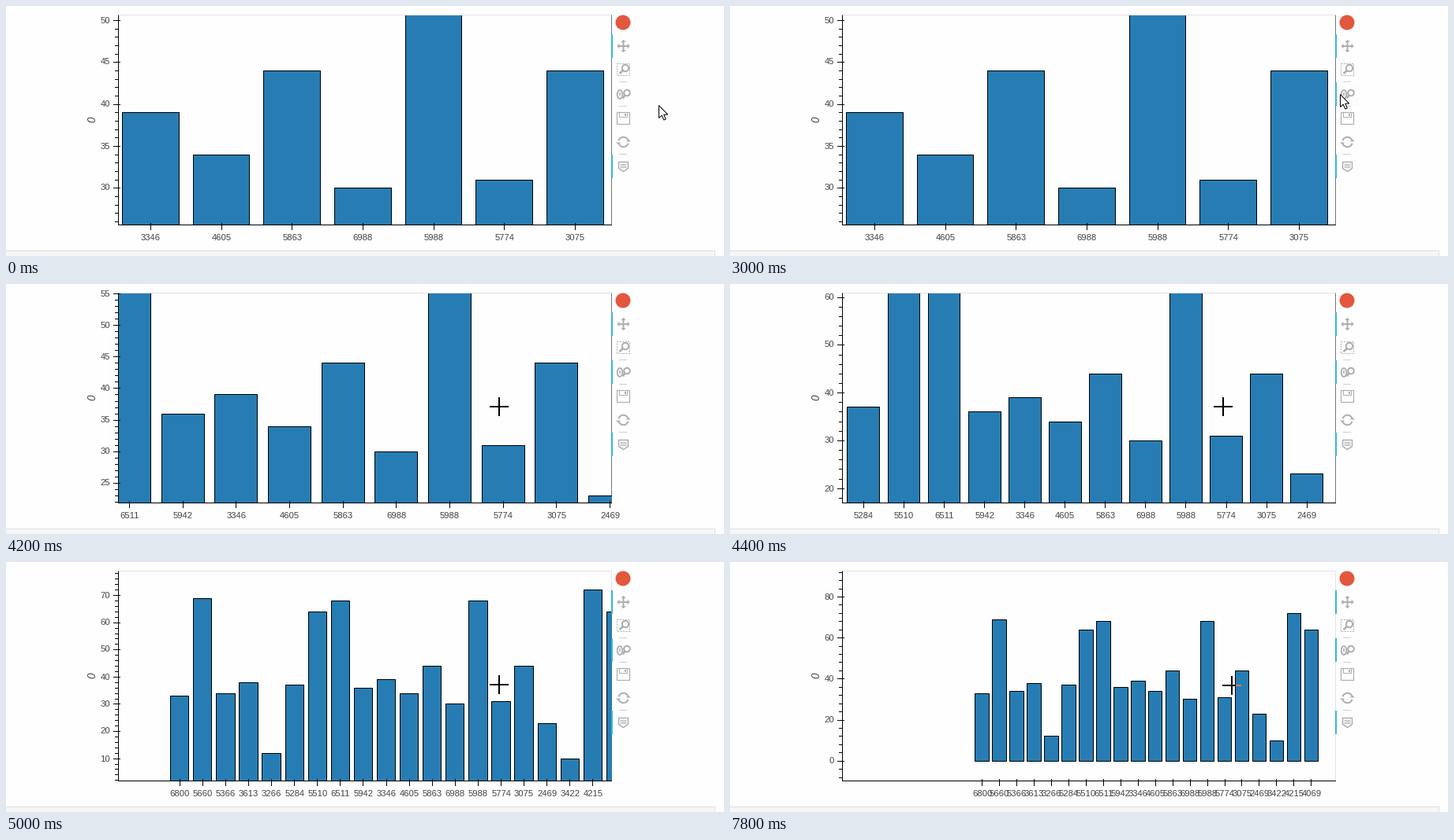
Animation of 910x318 px, one loop 8000 ms. Source, as a matplotlib script:

```python
import matplotlib.pyplot as plt
import numpy as np
from matplotlib.animation import FuncAnimation
from matplotlib.patches import Arc, Circle, Ellipse, Polygon, Rectangle

W, H, DPI = 910, 318, 100
STEP, LOOP = 200, 8000
PX = 72 / DPI
LEFT, RIGHT, TOP, BOTTOM = 142.5, 767.5, 11.5, 278.5

BACK, BLUE, INVERSE = "#fefefe", "#277db3", "#d8824c"
ICON, ACTIVE, INK = "#acafb1", "#3ab5d6", "#444444"

NAMES = ("6800 5660 5366 3613 3266 5284 5510 6511 5942 3346 "
         "4605 5863 6988 5988 5774 3075 2469 3422 4215 4069").split()
VALUES = [33, 69, 34, 38, 12, 37, 64, 68, 36, 39,
          34, 44, 30, 68, 31, 44, 23, 10, 72, 64]
ZOOM_TIMES = [4200, 4400, 4600, 5000, 5200]
ZOOM = 1.325

plt.rcParams["font.family"] = "Liberation Sans"
plt.rcParams["path.snap"] = False  # lines are placed on pixel centres here
fig = plt.figure(figsize=(W / DPI, H / DPI), dpi=DPI, facecolor=BACK)
ax = fig.add_axes([0, 0, 1, 1])
ax.set_xlim(0, W)
ax.set_ylim(H, 0)
ax.axis("off")
plot_area = Rectangle((LEFT, TOP), RIGHT - LEFT, BOTTOM - TOP,
                      transform=ax.transData)
live = []


def centre(v):
    """Centre of the pixel that holds v."""
    return np.floor(v) + 0.5


def put(artist, z=1):
    artist.set_zorder(z)
    ax.add_artist(artist)
    return artist


def line(xs, ys, color="black", width=1, z=3, **kw):
    kw.setdefault("solid_capstyle", "butt")
    return ax.plot(xs, ys, color=color, lw=width * PX, zorder=z, **kw)[0]


def box(x0, y0, x1, y1, fill="none", edge="none", z=1, width=1):
    return put(Rectangle((x0, y0), x1 - x0, y1 - y0, facecolor=fill,
                         edgecolor=edge, lw=width * PX), z)


def text(x, y, s, size=11.3, ha="center", color=INK, z=4, **kw):
    return ax.text(x, y, s, fontsize=size * PX, ha=ha, va="center",
                   color=color, zorder=z, **kw)


def lens(x, y, r, dx, dy):
    put(Circle((x, y), r, fill=False, ec=ICON, lw=2 * PX), 6)
    line([x - 0.7 * r, x - dx], [y + 0.7 * r, y + dy], ICON, 2.6, 6)


def triangle(x, y, dx, dy, size=3.2):
    tip = (x + dx * size, y + dy * size)
    put(Polygon([tip, (x - dy * size, y + dx * size),
                 (x + dy * size, y - dx * size)], fc=ICON, ec="none"), 6)


def toolbar():
    x = 782.5
    put(Circle((x - 0.5, 21), 9.5, fc="#e2583e", ec="none"), 6)
    # pan
    for dx, dy in [(1, 0), (-1, 0), (0, 1), (0, -1)]:
        line([x, x + 6 * dx], [51, 51 + 6 * dy], ICON, 2, 6)
        triangle(x + 5 * dx, 51 + 5 * dy, dx, dy)
    # box zoom
    line([774.5, 790.5, 790.5, 774.5, 774.5], [73.5, 73.5, 88.5, 88.5, 73.5],
         ICON, 1, 6, dashes=(2, 1.4))
    lens(785, 79, 4.2, 7.5, 7)
    # wheel zoom
    put(Ellipse((778, 112.5), 6.5, 11, fill=False, ec=ICON, lw=1.8 * PX), 6)
    line([778, 778], [110, 114], ICON, 1.6, 6)
    lens(787, 110.5, 3.8, 5, 7)
    # save
    box(774.5, 135.5, 790.5, 150.5, edge=ICON, z=6, width=1.2)
    box(777.5, 135.5, 787.5, 141.5, edge=ICON, z=6)
    box(784, 137, 786, 140, ICON, z=6)
    # reset
    for start in (15, 195):
        put(Arc((x, 173), 12.5, 12.5, theta1=start, theta2=start + 140,
                ec=ICON, lw=2 * PX), 6)
    triangle(x + 6.3, 172.5, 0, -1, 3)
    triangle(x - 6.3, 173.5, 0, 1, 3)
    # hover
    put(Polygon([(776.5, 198.5), (788.5, 198.5), (788.5, 206.5),
                 (782.5, 210.5), (776.5, 206.5)], fill=False, ec=ICON,
                lw=1.5 * PX, joinstyle="round"), 6)
    for y in (201.5, 203.5, 205.5):
        line([778.5, 786.5], [y, y], ICON, 1, 6)
    for y in (96.5, 127.5, 188.5):
        line([777, 787], [y, y], "#cfcfcf", 1, 6)
    for y in (36, 189):
        box(767, y, 769, y + 30, ACTIVE, z=6)


def backdrop():
    box(0, 312, 898, H, "#f6f6f6")
    line([0, 898.5, 898.5], [311.5, 311.5, H], "#dedede")
    line([LEFT, RIGHT], [TOP, TOP], "#e3e3e3", z=1)
    line([LEFT, LEFT], [TOP, BOTTOM + 0.5])
    line([LEFT, RIGHT + 0.5], [BOTTOM, BOTTOM])
    text(109.5, 144.6, "0", 13.5, rotation=90, style="italic")
    toolbar()


def chart(n):
    """Bars and ticks after n zoom steps about the crosshair."""
    sx, sy = 89.67 / ZOOM ** n, 10.66 / ZOOM ** n

    def y_of(v):
        return 156.5 - (v - 37.07) * sy

    right = "#777777" if n < 4 else "#e3e3e3"
    live.append(line([RIGHT, RIGHT], [TOP, BOTTOM], right, z=1))
    bars = []
    for i, (name, value) in enumerate(zip(NAMES, VALUES)):
        x = 625.5 + (i - 13.93) * sx
        bar = [centre(v) for v in (x - 0.4 * sx, y_of(value),
                                   x + 0.4 * sx, y_of(0))]
        patch = box(*bar, BLUE, "black", 2)
        patch.set_clip_path(plot_area)
        live.append(patch)
        bars.append(bar)
        if LEFT < x < RIGHT:
            live.append(line([centre(x)] * 2, [276, 285]))
            live.append(text(x, 294.8, name))

    span = (BOTTOM - TOP) / sy
    major = min((5, 10, 20), key=lambda s: abs(span / s - 6))
    minor = major // 5
    for v in range(-20, 101, minor):
        y = y_of(v)
        if not TOP <= y <= BOTTOM:
            continue
        if v % major:
            live.append(line([138, 142], [centre(y)] * 2))
        else:
            live.append(line([136, 145], [centre(y)] * 2))
            live.append(text(132, centre(y), str(v), ha="right"))
    return bars


def arrow(x, y):
    shape = [(0, 0), (0, 16), (3.7, 12.6), (6.3, 18.5),
             (8.8, 17.4), (6.2, 11.6), (11.3, 11.6)]
    live.append(put(Polygon(np.add(shape, (x + 0.5, y + 0.5)), fc="white",
                            ec="black", lw=PX, joinstyle="miter"), 9))


def crosshair(x, y, bars):
    """Black cross that turns to the inverse colour over a bar."""
    arms = [(x - 12, y - 1, x + 12, y + 1), (x - 1, y - 12, x + 1, y + 12)]
    for a in arms:
        live.append(box(*a, "black", z=9))
    for a in arms:
        for b in bars:
            x0, y0 = max(a[0], b[0] + 0.5), max(a[1], b[1] + 0.5)
            x1, y1 = min(a[2], b[2] - 0.5), min(a[3], b[3])
            if x0 < x1 and y0 < y1:
                live.append(box(x0, y0, x1, y1, INVERSE, z=10))


def ease(t, start, length):
    u = np.clip((t - start) / length, 0, 1)
    return u * u * (3 - 2 * u)


def pointer(t):
    if t < 200:
        return 827, 126
    if t < 2800:
        u = ease(t, 400, 1000)
        return 832 - 47 * u, 126 - 18 * u
    if t < 7400:
        u = ease(t, 2800, 1200)
        return round(785 - 160 * u), round(108 + 48 * u)
    u = (t - 7200) / 600
    return round(625 + 11 * u), round(156 + u + 6 * np.sin(np.pi * u))


def draw(k):
    while live:
        live.pop().remove()
    t = k * STEP
    bars = chart(sum(t >= z for z in ZOOM_TIMES))
    x, y = pointer(t)

    if 767 <= x <= 797 and 97 <= y <= 127:
        live.append(box(767, 97, 798, 127, "#fcfcfc", z=5))
    if t >= 2200:
        live.append(box(767, 97, 769, 127, ACTIVE, z=6))
    if 2000 <= t < 2200:
        live.append(box(785.5, 129.5, 866.5, 150.5, "white", "#666666", 8))
        live.append(text(826, 140.5, "Wheel Zoom", 12, color="black", z=9))
    if x < RIGHT:
        crosshair(x, y, bars)
    else:
        arrow(x, y)
    return live


backdrop()
anim = FuncAnimation(fig, draw, frames=LOOP // STEP, interval=STEP,
                     init_func=lambda: draw(0), repeat=True, repeat_delay=0,
                     blit=False)
plt.show()
```
